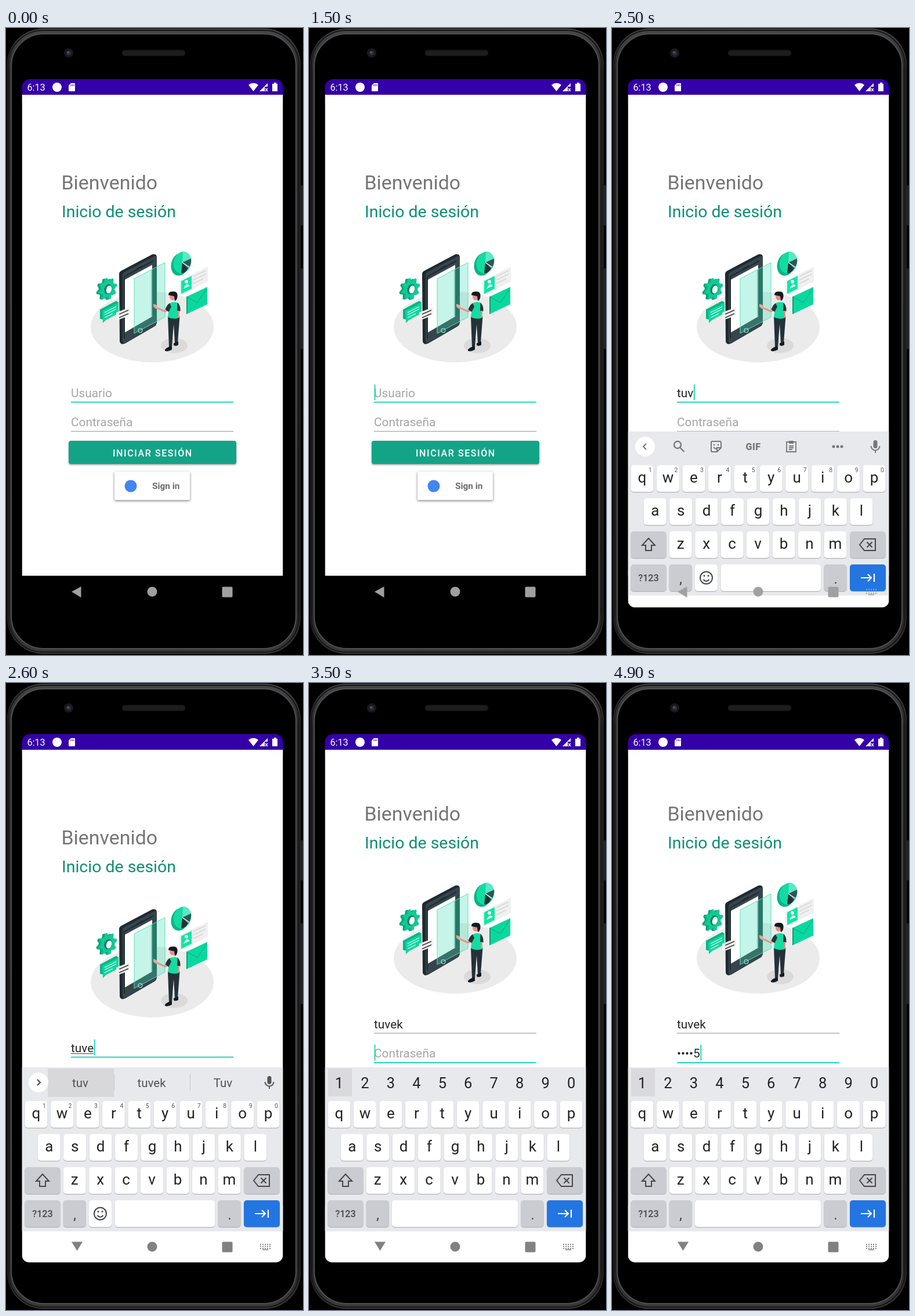
An HTML page with a canvas that plays this animation: 512x1080 px, repeating every 5000 ms.

```html
<!DOCTYPE html>
<html lang="es">
<head>
<meta charset="utf-8">
<title>Inicio de sesión</title>
<style>
html, body { margin: 0; width: 100%; height: 100%; overflow: hidden; background: #000; }
canvas { display: block; }
</style>
</head>
<body>
<canvas id="stage" width="512" height="1080"></canvas>
<script>
const LOOP = 5000;
const stage = document.getElementById('stage').getContext('2d');
const keyLayer = document.createElement('canvas');
keyLayer.width = 512;
keyLayer.height = 1080;
let g = stage;

const MINT = '#08e8a4', DEEP = '#08b583', SLATE = '#263238', FOCUS = '#1fd8b9';
const LEFT = 27.5, WIDTH = 450, PITCH = 44.45;
const USER = 'tuvek', USER_TIMES = [2190, 2390, 2490, 2590, 2690];
const PIN = '12345', PIN_TIMES = [3590, 3890, 4190, 4590, 4890];
const SCROLL_START = 3220, KEYPAD_SWAP = 3400;

// ---- helpers ----
function box(x, y, w, h, r, fill, stroke, width = 1) {
  g.beginPath();
  g.roundRect(x, y, w, h, r);
  if (fill) { g.fillStyle = fill; g.fill(); }
  if (stroke) { g.strokeStyle = stroke; g.lineWidth = width; g.stroke(); }
}
function oval(x, y, rx, ry, fill, tilt = 0) {
  g.beginPath();
  g.ellipse(x, y, rx, ry, tilt, 0, 7);
  g.fillStyle = fill;
  g.fill();
}
const dot = (x, y, r, fill) => oval(x, y, r, r, fill);
function shape(d, fill) {
  g.fillStyle = fill;
  g.fill(new Path2D(d));
}
function line(d, color, width = 2) {
  g.strokeStyle = color;
  g.lineWidth = width;
  g.stroke(new Path2D(d));
}
function label(str, x, y, size, color, { weight = 400, align = 'left', spacing = 0 } = {}) {
  g.font = `${weight} ${size}px Roboto, sans-serif`;
  g.letterSpacing = spacing + 'px';
  g.textAlign = align;
  g.fillStyle = color;
  g.fillText(str, x, y);
  const width = g.measureText(str).width;
  g.letterSpacing = '0px';
  return width;
}
function shadowed(color, blur, dy, draw) {
  g.save();
  g.shadowColor = color;
  g.shadowBlur = blur;
  g.shadowOffsetY = dy;
  draw();
  g.restore();
}
const clamp = v => Math.max(0, Math.min(1, v));
const easeOut = v => 1 - (1 - clamp(v)) ** 2;
const typedCount = (times, t) => times.filter(at => at <= t).length;

// ---- phone ----
function drawPhone() {
  g.fillStyle = '#000';
  g.fillRect(0, 0, 512, 1080);
  box(507, 271, 8, 69, 2, '#222224');
  box(507, 414, 8, 139, 2, '#222224');
  const metal = g.createLinearGradient(0, 0, 0, 1080);
  metal.addColorStop(0, '#48484a');
  metal.addColorStop(0.07, '#262628');
  metal.addColorStop(0.93, '#222224');
  metal.addColorStop(1, '#3c3c3e');
  box(2, 1, 506, 1077, 62, metal);
  box(4, 4, 501, 1071, 60, null, '#161617', 2);
  box(9, 10, 491, 1059, 56, '#000', '#505052', 2);
  dot(108, 43, 8, '#18191d');
  dot(108, 43, 4, '#293041');
  dot(107, 42, 1.5, '#53627c');
  box(200, 38, 109, 10, 5, '#1d1d1e', '#111');
}

function drawStatusBar() {
  box(LEFT, 88, WIDTH, 40, [14, 14, 0, 0], '#3400a8');
  label('6:13', 36.5, 108, 16.2, '#fff');
  dot(88, 102, 8, '#fff');
  shape('M112 95h6a1 1 0 0 1 1 1v12a1 1 0 0 1-1 1h-9a1 1 0 0 1-1-1V99z', '#fff');
  line('M112 97v3M114.500 97v3M117 97v3', '#3400a8', 1);
  shape('M418 98Q426.500 91.500 435 98L426.500 109z', '#fff');
  shape('M437 109L451 95V101H446V109z', '#fff');
  line('M447 104l4 5M451 104l-4 5', '#fff', 1.3);
  shape('M462 94h4v2h2v13h-9V96h3z', '#fff');
}

// ---- illustration ----
function drawGear() {
  const cog = (x, y, fill) => {
    g.save();
    g.translate(x, y);
    g.rotate(0.3);
    g.beginPath();
    for (let k = 0; k < 32; k++) {
      const r = k % 4 < 2 ? 1 : 0.75, a = (k + 0.5) * Math.PI / 16;
      g.lineTo(15 * r * Math.cos(a), 19.5 * r * Math.sin(a));
    }
    g.closePath();
    g.fillStyle = fill;
    g.fill();
    g.restore();
  };
  cog(171, 450, '#079a70');
  cog(173, 450, DEEP);
  cog(176, 449, '#10cb96');
  oval(176, 450, 6.5, 9, '#07835f', 0.3);
  oval(177.500, 450.500, 4.5, 7, '#fff', 0.3);
}

function drawPerson() {
  oval(290, 547, 23, 13, '#dadada');
  shape('M279 497H299.500L296 542H291L289 510L286 550H281z', '#243139');
  shape('M274 554Q278 549 286 548V554Q279 558 274 556z', '#111a20');
  shape('M289 543L297 540V546Q291 549 289 546z', '#111a20');
  line('M283 484L274 488L258 481', '#ef8d86', 3);
  shape('M254 475l5 2l3 5l-3 2l-5-4z', '#f3a097');
  shape('M282 474Q290 470 297 474L299 499Q289 503 279 498z', '#14dca2');
  shape('M282 474Q277 477 274.500 485L280.500 489L285 480z', SLATE);
  shape('M295.500 473Q301 477 300.500 488L295 487z', SLATE);
  line('M298 487L297 498', '#ef8d86', 2.5);
  dot(288, 463, 6, '#ed8c85');
  shape('M280 460Q280 453 288 454Q296 453 295.500 462Q295 469 291 470L290 462z', '#101b22');
}

function drawIllustration() {
  oval(252, 515, 106, 61, '#ebebeb');
  shape('M195 424Q195 420 199 418L252 390Q260 388 260 396V506Q260 511 256 514L206 543Q198 547 196 540z', '#1f2a30');
  shape('M201 426Q201 422 205 420L254 394Q260 391 260 397V506Q260 510 257 513L206 542Q201 545 201 538z', '#36454c');
  shape('M204 434L252 408V497L204 525z', '#fff');
  line('M225 416l11-6', '#0f171b', 2);
  line('M204 535V428L254 401', '#202c32', 2);
  shape('M221 432L274 404V498L221 526z', 'rgba(60,220,180,.3)');
  shape('M250 417L260 411.500V492L250 497z', 'rgba(8,130,100,.35)');
  line('M221 432L274 404V498L221 526z', '#5fdcbd', 1);
  line('M228 521a3.500 3.500 0 1 0 7 0a3.500 3.500 0 1 0-7 0', '#8feed6', 1.2);
  drawGear();

  shape('M162 485L190 470L194 473V491L172 503L167 508V502L162 501z', DEEP);
  shape('M166 487L194 473V491L171 503L167 507z', '#0bd79c');
  line('M170 490l20-10M170 494l20-10M170 499l14-7', '#e8fff7', 1.3);
  shape('M190 490L214 481V495L190 504z', '#f1f1f1');
  line('M195 493l16-7M195 499l16-7', '#3a3a3a', 1.5);

  oval(300, 407, 15, 20, DEEP, 0.3);
  oval(304, 404, 15, 19, '#13dba2', 0.3);
  shape('M304 404L305 385Q317 386 319 399z', '#58e9c5');
  shape('M304 404L319 397Q320 405 315 413z', '#36525a');
  shape('M304 404L314 414Q308 424 302 422z', SLATE);
  line('M304 404L316 412', '#fff', 1.3);

  shape('M299 435L348 411V437L299 461z', '#f0f0f0');
  shape('M302 436L320 427V449L302 458z', MINT);
  dot(311, 437, 3, '#fff');
  shape('M306 449Q311 437 317 444z', '#fff');
  line('M323 428l21-10M323 434l21-10M323 440l17-8', '#d6d6d6', 1.5);
  shape('M311 463L347 446V476L311 493z', '#0bd89e');
  shape('M311 463l2-1V491l-2 2z', '#079c72');
  line('M313 464L330 473L346 449', '#06a67c', 1);
  drawPerson();
}

// ---- login form ----
function drawCursor(x, top) {
  g.fillStyle = FOCUS;
  g.fillRect(x, top, 2, 27);
}

function drawForm(t) {
  const user = USER.slice(0, typedCount(USER_TIMES, t));
  const pinLength = typedCount(PIN_TIMES, t);
  const pin = pinLength ? '•'.repeat(pinLength - 1) + PIN[pinLength - 1] : '';
  const onPin = t >= SCROLL_START;
  const events = [500, 2000, SCROLL_START, ...USER_TIMES, ...PIN_TIMES].filter(e => e <= t);
  const blink = events.length > 0 && (t - Math.max(...events)) % 1000 < 500;

  g.save();
  g.beginPath();
  g.rect(LEFT, 115, WIDTH, 828.5);
  g.clip();
  g.fillStyle = '#fff';
  g.fillRect(LEFT, 115, WIDTH, 829);
  g.translate(0, -41 * easeOut((t - SCROLL_START) / 200));

  label('Bienvenido', 95.500, 278, 33.9, '#757575');
  label('Inicio de sesión', 96, 326, 28.46, '#0c8f73');
  drawIllustration();

  const fieldText = (value, hint, y) => value
    ? label(value, 112, y, 20.8, '#262626')
    : (label(hint, 112, y, 20.8, '#a6a6a6'), 0);
  const userWidth = fieldText(user, 'Usuario', 636);
  const pinWidth = fieldText(pin, 'Contraseña', 686);
  const underline = (y, active) => {
    g.fillStyle = active ? FOCUS : '#b3b3b3';
    g.fillRect(112, y, 280, active ? 2 : 1.5);
  };
  underline(643.500, !onPin);
  underline(694, onPin);
  if (user && t > 2550 && !onPin) {
    g.fillStyle = '#444';
    g.fillRect(112, 638, userWidth, 1);
  }
  if (blink) {
    if (onPin) drawCursor(112.5 + pinWidth, 664);
    else drawCursor(112.5 + userWidth, 614);
  }

  shadowed('rgba(0,0,0,.4)', 3, 1.5, () => box(108, 711, 289, 40, 4, '#13a488'));
  label('INICIAR SESIÓN', 184, 738, 16, '#fff', { weight: 500, spacing: 1.6 });
  shadowed('rgba(0,0,0,.5)', 4, 1.5, () => box(187, 764, 130, 49, 2, '#fff'));
  dot(215, 789, 10.5, '#4285f4');
  label('Sign in', 252, 794, 15.4, '#6c6c6c', { weight: 700 });
  g.restore();
}

// ---- keyboard ----
function key(x, y, w, fill = '#fff') {
  shadowed('rgba(0,0,0,.28)', 1, 1, () => box(x, y, w, 46, 5, fill));
}
function letterRow(letters, x, y, numbered) {
  [...letters].forEach((ch, i) => {
    const left = x + i * PITCH;
    key(left, y, 39);
    label(ch, left + 19.5, y + 30, 26, '#222', { align: 'center' });
    if (numbered) label((i + 1) % 10, left + 33.5, y + 12, 10.5, '#555', { align: 'center' });
  });
}

function drawMic(color) {
  box(450.500, 677, 7, 14, 3.5, color);
  line('M446.500 687a7.500 7.500 0 0 0 15 0M454 694v5', color, 2);
}

function drawToolbar() {
  const tone = '#777';
  dot(57, 688, 17, '#fff');
  line('M59 683l-5 5l5 5', tone);
  line('M107 685a6 6 0 1 0 12 0a6 6 0 1 0-12 0M117.500 690l7 7', tone, 2.4);
  line('M173 679h13a2 2 0 0 1 2 2v9l-7 7h-8a2 2 0 0 1-2-2V681a2 2 0 0 1 2-2M188 690h-7v7M175 689q4 5 7 0', tone);
  dot(176, 685, 1.3, tone);
  dot(183, 685, 1.3, tone);
  label('GIF', 243.500, 694, 16, tone, { weight: 900, align: 'center', spacing: 0.5 });
  line('M301 680h16v17h-16zM305 687h8M305 690h8M305 693h6', tone, 1.8);
  box(305, 678, 8, 5, 1, tone);
  [382, 389, 396].forEach(x => dot(x, 688, 2.5, tone));
  drawMic(tone);
}

function drawSuggestions(words) {
  box(72, 664, 114, 49, 0, '#d8d8db');
  dot(56, 688, 17, '#fff');
  line('M54 683l5 5l-5 5', '#444');
  words.forEach((word, i) => label(word, 128 + i * 123, 696, 20.5, '#505256', { align: 'center' }));
  line('M186.500 674v28M317.500 674v28', '#c5c6ca', 1);
  drawMic('#555');
}

function drawNumbers() {
  box(33, 664, 41, 48, 0, '#dadade');
  for (let i = 0; i < 10; i++) {
    label((i + 1) % 10, 52 + i * PITCH, 698, 25.5, '#222', { align: 'center' });
  }
}

function drawNavIcons(color, open) {
  shape(open ? 'M113 962.500H132L122.500 978z' : 'M113 971L129.500 962V981z', color);
  dot(252, 971, 8.5, color);
  box(372.500, 962.500, 18, 18, 2, color);
}

function drawKeyboardDots(color) {
  g.fillStyle = color;
  for (let i = 0; i < 15; i++) {
    g.fillRect(438 + i % 5 * 4, 966 + Math.floor(i / 5) * 3.5, 2, 2);
  }
  g.fillRect(442, 975.5, 10, 1.5);
}

function drawKeyboard(t) {
  const secret = t >= KEYPAD_SWAP, grey = '#cbccd1', ink = '#44464a';
  g.clearRect(0, 0, 512, 1080);
  box(LEFT, 900, WIDTH, 98, [0, 0, 12, 12], '#fff');
  g.fillStyle = '#e8e9ed';
  g.fillRect(LEFT, 662, WIDTH, 282.5);

  if (secret) drawNumbers();
  else if (t < 2550) drawToolbar();
  else drawSuggestions(t < 2680 ? ['tuv', 'tuvek', 'Tuv'] : ['tuvek', 'Tuvel', 'Tuvels']);

  letterRow('qwertyuiop', 32.5, 720, !secret);
  letterRow('asdfghjkl', 54.7, 777);
  letterRow('zxcvbnm', 98.7, 834);

  key(32.5, 834, 61, grey);
  line('M63 846L52 858H58V867H68V858H74z', ink);
  key(410.5, 834, 61, grey);
  line('M435 847H454V867H435L427 857zM439.500 852.500l9 9M448.500 852.500l-9 9', ink);

  key(32.5, 891, 61, grey);
  label('?123', 63, 920, 16.2, ink, { weight: 500, align: 'center' });
  key(98.7, 891, 39, grey);
  label(',', 118.500, 924, 23, '#333', { align: 'center' });
  if (!secret) {
    key(143, 891, 39);
    line('M152 914a10.500 10.500 0 1 0 21 0a10.500 10.500 0 1 0-21 0M157.500 917q5 6 10 0', ink);
    dot(159, 910.500, 1.5, ink);
    dot(166, 910.500, 1.5, ink);
  }
  key(secret ? 143 : 187.5, 891, secret ? 217 : 172.5);
  key(365.5, 891, 39, grey);
  label('.', 385.500, 924, 23, '#333', { align: 'center' });
  key(410, 891, 62, '#2375e1');
  line('M429 914H447M441 908l6 6l-6 6M452 907V921', '#fff', 2.2);
}

function drawKeyboardLayer(t) {
  const p = clamp((t - 2295) / 300);
  if (p > 0) {
    g = keyLayer.getContext('2d');
    drawKeyboard(t);
    g = stage;
    g.save();
    g.beginPath();
    g.roundRect(LEFT, 600, WIDTH, 398, [0, 0, 12, 12]);
    g.clip();
    g.globalAlpha = clamp(p * 1.5);
    g.drawImage(keyLayer, 0, 336 * (1 - easeOut(p)));
    g.restore();
  }
  const open = p > 0.9;
  drawNavIcons(open ? '#818181' : '#a0a0a0', open);
  if (p > 0) drawKeyboardDots(open ? '#818181' : '#a0a0a0');
}

function frame(now) {
  const t = now % LOOP;
  drawPhone();
  drawStatusBar();
  drawForm(t);
  drawKeyboardLayer(t);
  requestAnimationFrame(frame);
}
requestAnimationFrame(frame);
</script>
</body>
</html>
```
